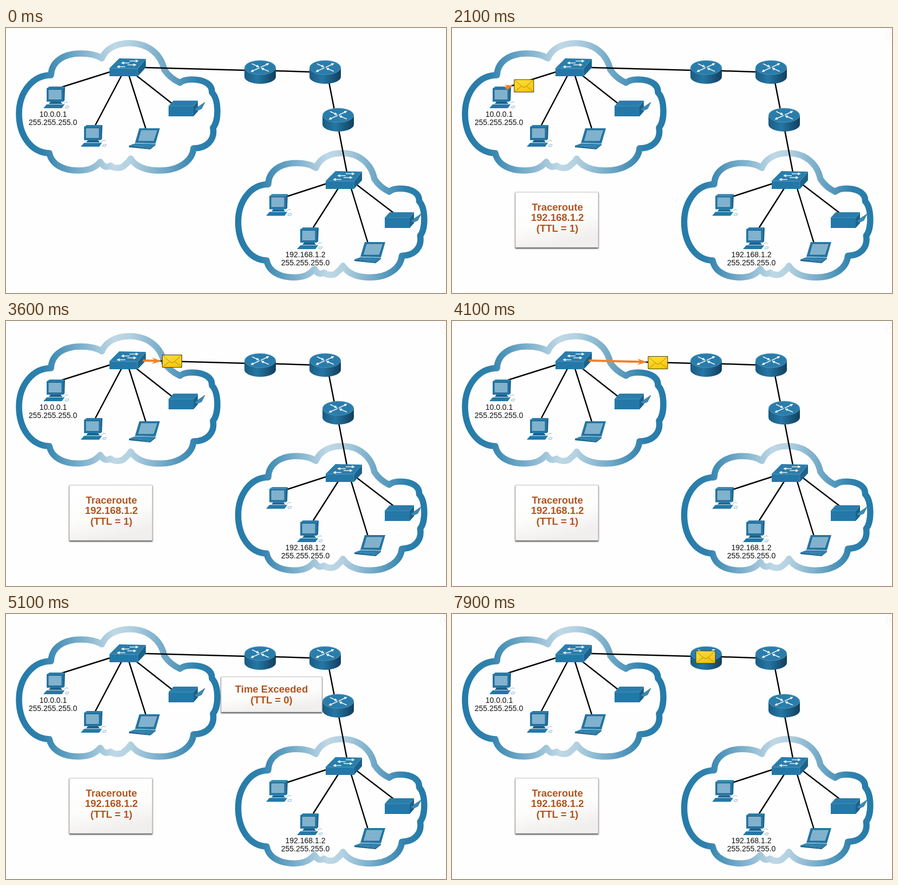
Write an HTML page that moves like this. It is 812 px wide and 489 px high and loops after 8 s.

```html
<!DOCTYPE html>
<html lang="en">
<head>
<meta charset="utf-8">
<title>Traceroute</title>
<style>
  html, body { margin: 0; width: 100%; height: 100%; overflow: hidden; background: #fefefe; }
  svg { display: block; width: 812px; height: 489px; }
  text { text-anchor: middle; font-family: "Liberation Sans", Arial, sans-serif; }
  .label { font-size: 14px; fill: #111; }
  .note { font-size: 18.5px; font-weight: bold; fill: #b0541f; }
  .top { fill: #2a7dab; }
  .front { fill: #2378a7; }
  .side { fill: #1b628c; }
  .glass { fill: #80b2ce; stroke: #155478; stroke-width: .8; }
  .white { fill: none; stroke: #f4f8fa; stroke-width: 1.4; marker-end: url(#tip); }
  .edge { fill: none; stroke: #5b9cbf; stroke-width: .7; }
</style>
</head>
<body>
<svg viewBox="0 0 812 489">
  <defs>
    <linearGradient id="cloudInk">
      <stop offset="0" stop-color="#257ba9"/>
      <stop offset=".12" stop-color="#2f81ad"/>
      <stop offset=".48" stop-color="#bfd8e6"/>
      <stop offset=".56" stop-color="#b4d1e1"/>
      <stop offset=".9" stop-color="#2f81ad"/>
      <stop offset="1" stop-color="#257ba9"/>
    </linearGradient>
    <linearGradient id="drum">
      <stop offset="0" stop-color="#1a5b82"/>
      <stop offset=".4" stop-color="#2577a5"/>
      <stop offset="1" stop-color="#123f5e"/>
    </linearGradient>
    <linearGradient id="paper" x2=".3" y2="1">
      <stop offset="0" stop-color="#fff"/>
      <stop offset=".6" stop-color="#fdfdfc"/>
      <stop offset="1" stop-color="#f1efee"/>
    </linearGradient>
    <linearGradient id="gold" x2=".5" y2="1">
      <stop offset="0" stop-color="#ffe03c"/>
      <stop offset="1" stop-color="#f8c80c"/>
    </linearGradient>
    <filter id="shadow" x="-10%" y="-10%" width="120%" height="125%">
      <feDropShadow dx="0" dy="1.5" stdDeviation="1" flood-color="#000" flood-opacity=".9"/>
    </filter>
    <marker id="tip" viewBox="0 0 6 6" refX="4" refY="3" markerWidth="5.500" markerHeight="5.500" markerUnits="userSpaceOnUse" orient="auto">
      <path d="M0 0L6 3L0 6Z" fill="#f4f8fa"/>
    </marker>

    <path id="cloud" d="M83 87C48 87 24 120 24 158C24 198 46 230 80 231C84 252 106 263 134 263
      C156 263 166 256 174 247C180 257 186 258 193 254C200 260 214 260 220 252Q226 248 230 241
      C240 257 260 263 284 263C318 263 344 246 346 222C371 222 386 206 382 184
      C393 172 393 132 380 119C381 102 362 95 343 95C334 95 327 96 321 101
      C312 97 301 90 292 77C286 48 262 28 228 28C204 28 184 38 177 56
      C168 50 154 47 138 47C106 47 84 62 83 87Z"
      fill="#fefefe" stroke="url(#cloudInk)" stroke-width="11.500" stroke-linejoin="round" vector-effect="non-scaling-stroke"/>

    <g id="switch">
      <path class="top" d="M191 74L209 56L258 57L243 75Z"/>
      <path class="front" d="M191 74L243 75V89H191Z"/>
      <path class="side" d="M243 75L258 57V73L243 89Z"/>
      <path class="edge" d="M191 74L243 75L258 57M243 75V89"/>
      <path class="white" d="M228 61H243"/>
      <path class="white" d="M228 64.500H214"/>
      <path class="white" d="M224 68H239"/>
      <path class="white" d="M220 71.500H206"/>
    </g>

    <g id="router">
      <path d="M440 73V90A29 13 0 0 0 498 90V73Z" fill="url(#drum)"/>
      <ellipse class="top" cx="469" cy="73" rx="28.600" ry="13" stroke="#5b9cbf" stroke-width=".8"/>
      <path class="white" d="M454 66L466 71.500"/>
      <path class="white" d="M485 80L472 74.500"/>
      <path class="white" d="M470 72.500L484 66"/>
      <path class="white" d="M468 73.500L453 80"/>
    </g>

    <g id="pc">
      <path class="side" d="M105 111L109 108L108 134L105 136Z"/>
      <path class="top" d="M76 111L80 108H109L105 111Z"/>
      <path class="front" d="M75 111H106V136H75Z"/>
      <path class="glass" d="M78 113.500H103V132.500H78Z"/>
      <path class="side" d="M82 136H101L104 140H79Z"/>
      <path class="front" d="M75 141H108L103 148H69Z"/>
      <path class="edge" d="M76 141H108"/>
      <path d="M107 139Q113 134 115 138M109 147L111 144H116L114 148Z" fill="#fff" stroke="#6ea5c3" stroke-width=".8"/>
    </g>

    <g id="laptop">
      <path class="front" d="M246 185H284L276 213L238 212Z"/>
      <path class="glass" d="M249 188H280L273 209H243Z"/>
      <path class="top" d="M238 213L276 214L265 222L227 217Z"/>
      <path class="side" d="M227 217L265 222L276 214V216L266 224L227 220Z"/>
      <path class="edge" d="M238 213L276 214M236 216L266 218M246 219L253 220"/>
    </g>

    <g id="printer">
      <path class="top" d="M300 144L309 134H354L346 144Z"/>
      <path class="front" d="M300 144H346V163H300Z"/>
      <path class="side" d="M346 144L354 134V154L346 163Z"/>
      <path class="edge" d="M300 144H346L354 134"/>
      <path d="M348 150L367 137L361 149L352 153Z" fill="#3d8ab4" stroke="#1b628c" stroke-width=".7"/>
    </g>

    <g id="envelope">
      <path d="M.5 .5H36.500V23.500H.5Z" fill="url(#gold)" stroke="#3f360a"/>
      <path d="M1 23L14 12.500M36 23L23 12.500M1 1L15 13.500Q18.500 16.500 22 13.500L36 1" fill="none" stroke="#a97f0a" stroke-width=".9"/>
    </g>
  </defs>

  <rect width="812" height="489" fill="#fefefe"/>
  <use href="#cloud"/>
  <use href="#cloud" transform="translate(406 203.500) scale(.938 .976)"/>

  <path stroke="#000" stroke-width="2.500" d="M103 109L192 81M165 179L213 88M258 186L227 88M306 139L241 88
    M257 73L441 78M498 79L560 81M596 100L606 151M614 188L629 266
    M518 311L592 287M567 368L613 296M668 397L637 296M715 341L647 289"/>

  <use href="#switch"/><use href="#switch" x="399" y="208"/>
  <use href="#router"/><use href="#router" x="120"/><use href="#router" x="144" y="88"/>
  <use href="#pc"/><use href="#pc" x="69" y="71"/><use href="#pc" x="411" y="198.500"/><use href="#pc" x="468" y="260"/>
  <use href="#laptop"/><use href="#laptop" x="416" y="210"/>
  <use href="#printer"/><use href="#printer" x="399" y="206"/>

  <g class="label">
    <text x="87" y="164">10.0.0.1</text>
    <text x="86.500" y="179">255.255.255.0</text>
    <text x="552.500" y="423">192.168.1.2</text>
    <text x="552.500" y="438">255.255.255.0</text>
  </g>

  <g id="corner" fill="none" stroke="#f0f0f0">
    <circle cx="813" cy="12" r="11.500"/>
    <path d="M812 8H808.500V16H812M808.500 12H812"/>
  </g>

  <g id="card" class="note">
    <rect x="117" y="303" width="153" height="102" fill="url(#paper)" stroke="#a5a29f" stroke-width=".6" filter="url(#shadow)"/>
    <text x="194.500" y="337">Traceroute</text>
    <text x="194.500" y="356">192.168.1.2</text>
    <text x="194.500" y="376">(TTL = 1)</text>
  </g>

  <g id="callout" class="note">
    <rect x="397" y="116" width="186" height="65" fill="url(#paper)" stroke="#a5a29f" stroke-width=".6" filter="url(#shadow)"/>
    <text x="490" y="145">Time Exceeded</text>
    <text x="490" y="165">(TTL = 0)</text>
  </g>

  <use id="ready" href="#envelope" x="73" y="111"/>
  <g id="hop1"><path fill="#f58025"/><use href="#envelope"/></g>
  <g id="hop2"><path fill="#f58025"/><use href="#envelope"/></g>
  <use id="reply" href="#envelope" x="449.500" y="67.500"/>
</svg>
<script>
const LOOP = 8000, STEP = 100;
const byId = id => document.getElementById(id);

// Opacity over time: [ms, value], linear in between.
const fades = {
  corner: [[300, 0], [500, 1]],
  card: [[1000, 0], [1400, 1]],
  ready: [[1000, 0], [1400, .65], [1500, .85], [1900, 0]],
  hop1: [[1999, 0], [2000, 1], [2800, 1], [3300, 0]],
  hop2: [[3399, 0], [3400, 1], [4700, 1], [5100, 0]],
  callout: [[4700, 0], [5100, 1], [6899, 1], [6900, 0]],
  reply: [[7400, 0], [7900, .97]]
};

// Arrow tail and tip, and the envelope pushed along ahead of the tip.
const hops = {
  hop1: { start: 1960, end: 2800, tail: [98, 110.5], tip: [184, 84.7], from: [100, 100], to: [186, 68.3] },
  hop2: { start: 3362, end: 4668, tail: [252.5, 73], tip: [442, 77.8], from: [253, 60.8], to: [445, 68] }
};

const mix = (a, b, k) => a + (b - a) * k;
const clamp = k => Math.max(0, Math.min(1, k));

function valueAt(keys, t) {
  const next = keys.findIndex(key => key[0] > t);
  if (next === 0) return keys[0][1];
  if (next < 0) return keys[keys.length - 1][1];
  const [t0, v0] = keys[next - 1], [t1, v1] = keys[next];
  return mix(v0, v1, (t - t0) / (t1 - t0));
}

function drawHop(id, t) {
  const { start, end, tail, tip, from, to } = hops[id];
  const [arrow, mail] = byId(id).children;
  const k = clamp((t - start) / (end - start));
  const dx = tip[0] - tail[0], dy = tip[1] - tail[1];
  const length = Math.hypot(dx, dy) * k;
  const head = Math.min(18, length), neck = length - head * .75;
  const angle = Math.atan2(dy, dx) * 180 / Math.PI;
  arrow.setAttribute('d', `M0-2H${neck}L${length - head}-6L${length} 0L${length - head} 6L${neck} 2H0Z`);
  arrow.setAttribute('transform', `translate(${tail}) rotate(${angle})`);
  mail.setAttribute('transform', `translate(${mix(from[0], to[0], k)} ${mix(from[1], to[1], k)})`);
}

function draw(time) {
  const t = Math.floor(time % LOOP / STEP) * STEP;
  for (const id in fades) byId(id).style.opacity = valueAt(fades[id], t);
  for (const id in hops) drawHop(id, t);
}

const begin = performance.now();
function tick() {
  draw(performance.now() - begin);
  requestAnimationFrame(tick);
}
tick();
</script>
</body>
</html>
```
